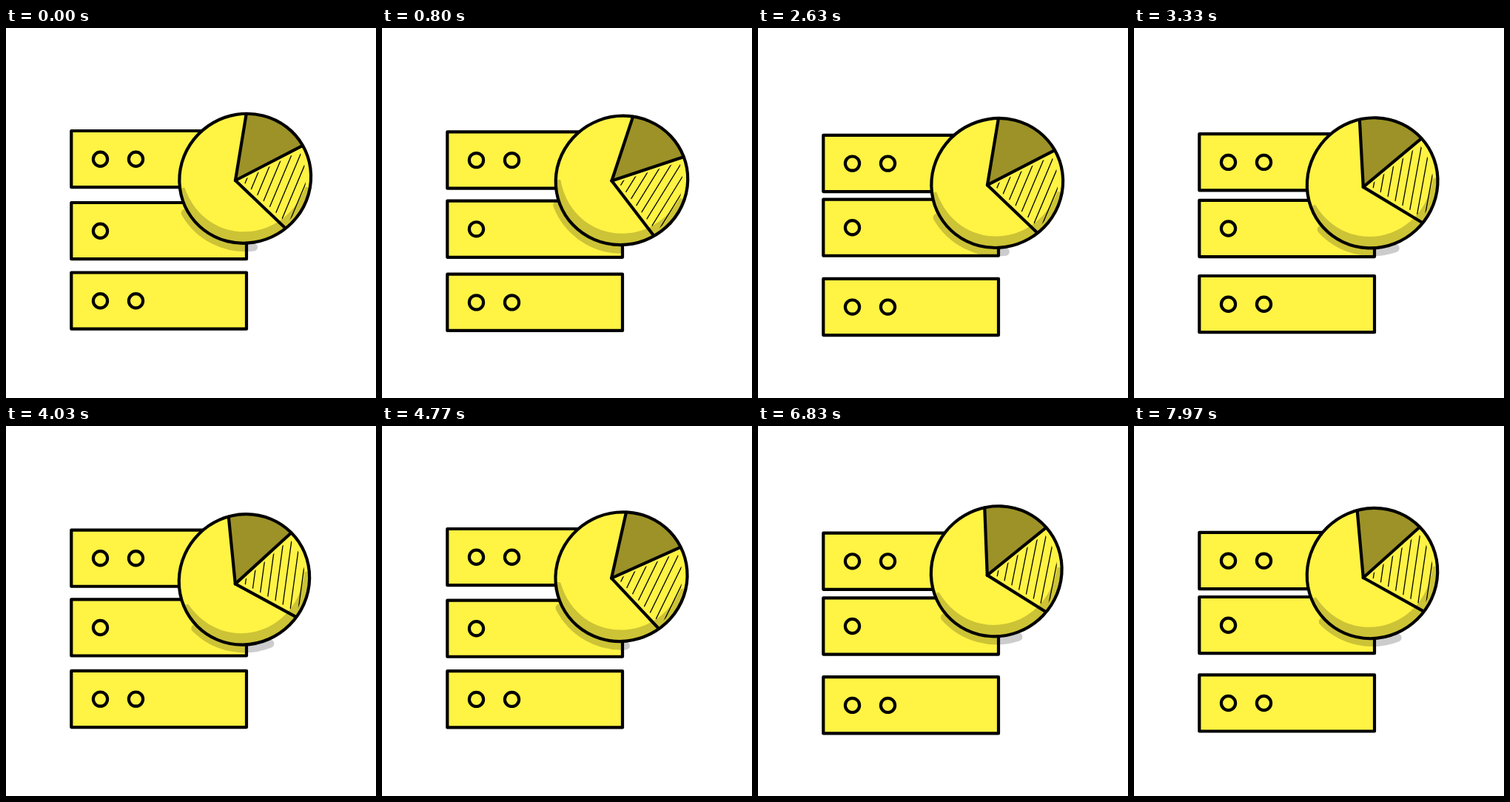
Recreate the animation shown at these times as an HTML page with a canvas. Size 500x500 px, loop 8 s.

```html
<!DOCTYPE html>
<html lang="en">
<head>
<meta charset="utf-8">
<title>Server stack with pie chart</title>
<style>
  html, body { margin: 0; width: 100%; height: 100%; overflow: hidden; background: #fff; }
  canvas { display: block; width: 500px; height: 500px; }
</style>
</head>
<body>
<canvas id="stage"></canvas>
<script>
const LOOP = 8000;
const YELLOW = '#fff344', OLIVE = '#9c9227', SHADE = 'rgba(0,0,0,.2)';
const LINE = 4.2;
const RAD = Math.PI / 180;

const canvas = document.getElementById('stage');
const dpr = window.devicePixelRatio || 1;
canvas.width = canvas.height = Math.round(500 * dpr);
const ctx = canvas.getContext('2d');

// Eases back and forth between two values, turning round at the given seconds.
function sway(from, to, ...turns) {
  return t => {
    let i = 0;
    while (t > turns[i + 1]) i++;
    const u = (t - turns[i]) / (turns[i + 1] - turns[i]);
    const eased = (1 - Math.cos(Math.PI * u)) / 2;
    return from + (to - from) * (i % 2 ? 1 - eased : eased);
  };
}

const rows = [
  { dots: 2, y: sway(139, 145, 0, 2.45, 4.85, 7.2, 10) },
  { dots: 1, y: sway(236, 230.8, 0, 1.7, 5.5, 7.6, 10.5) },
  { dots: 2, y: sway(330.5, 339.2, 0, 2.4, 4.3, 6.85, 9.7) }
];
const pieY = sway(196.3, 209.6, -3.2, 3, 6.8, 10.7);
const pieTurn = sway(-17, 11.6, -1.87, 1.6, 3.85, 5.35, 7.35, 11.5);

// Chart points relative to the disc centre.
const hub = [-13.3, 2.5];
const spokes = [[3, -87.3], [77.5, -42.7], [52.7, 67.5]];

function pen(width, color = '#000') {
  ctx.lineWidth = width;
  ctx.strokeStyle = color;
}

function line(x1, y1, x2, y2) {
  ctx.beginPath();
  ctx.moveTo(x1, y1);
  ctx.lineTo(x2, y2);
  ctx.stroke();
}

function clipped(path, paint) {
  ctx.save();
  path();
  ctx.clip();
  paint();
  ctx.restore();
}

function drawRow(y, dots) {
  pen(LINE);
  ctx.fillStyle = YELLOW;
  ctx.beginPath();
  ctx.rect(88.3, y, 236.7, 76.2);
  ctx.fill();
  ctx.stroke();
  for (let i = 0; i < dots; i++) {
    ctx.beginPath();
    ctx.arc(127.5 + 48 * i, y + 38.2, 9.6, 0, 2 * Math.PI);
    ctx.stroke();
  }
}

function discPath() {
  ctx.beginPath();
  ctx.ellipse(0, 0, 89.6, 86.8, -29 * RAD, 0, 2 * Math.PI);
}

// The striped slice, inset from its outline.
function stripePath() {
  ctx.beginPath();
  ctx.moveTo(-4.5, 3);
  ctx.arc(0, 0, 82, -25.5 * RAD, 48 * RAD);
  ctx.closePath();
}

function drawStripes() {
  pen(1.3);
  for (let i = 0; i < 8; i++) {
    const x = 2.5 + 11.8 * i;
    line(x + 44, -100, x - 44, 100);
  }
}

function drawFills() {
  ctx.fillStyle = OLIVE;
  ctx.beginPath();
  ctx.moveTo(...hub);
  ctx.lineTo(...spokes[0]);
  ctx.lineTo(60, -110);
  ctx.lineTo(...spokes[1]);
  ctx.fill();

  ctx.fillStyle = SHADE;
  ctx.beginPath();
  ctx.moveTo(-82, 11);
  ctx.bezierCurveTo(-55, 92, 50, 92, 81, 13);
  ctx.lineTo(110, 13);
  ctx.lineTo(110, 110);
  ctx.lineTo(-110, 110);
  ctx.lineTo(-110, 11);
  ctx.fill();
}

function drawPie(y, turn) {
  ctx.save();
  ctx.translate(323.3 + 4.9 * Math.sin(turn), y);
  ctx.rotate(turn);

  pen(11, SHADE);
  ctx.beginPath();
  ctx.arc(0, 0, 93.5, 84 * RAD, 151 * RAD);
  ctx.stroke();

  discPath();
  ctx.fillStyle = YELLOW;
  ctx.fill();
  clipped(discPath, drawFills);
  clipped(stripePath, drawStripes);

  pen(LINE);
  spokes.forEach(s => line(...hub, ...s));
  discPath();
  ctx.stroke();
  ctx.restore();
}

function draw(now) {
  const t = (now % LOOP) / 1000;
  ctx.setTransform(dpr, 0, 0, dpr, 0, 0);
  ctx.fillStyle = '#fff';
  ctx.fillRect(0, 0, 500, 500);
  ctx.lineCap = ctx.lineJoin = 'round';
  rows.forEach(row => drawRow(row.y(t), row.dots));
  drawPie(pieY(t), pieTurn(t) * RAD);
}

const start = performance.now();
function tick() {
  draw(performance.now() - start);
  requestAnimationFrame(tick);
}
tick();
</script>
</body>
</html>
```
